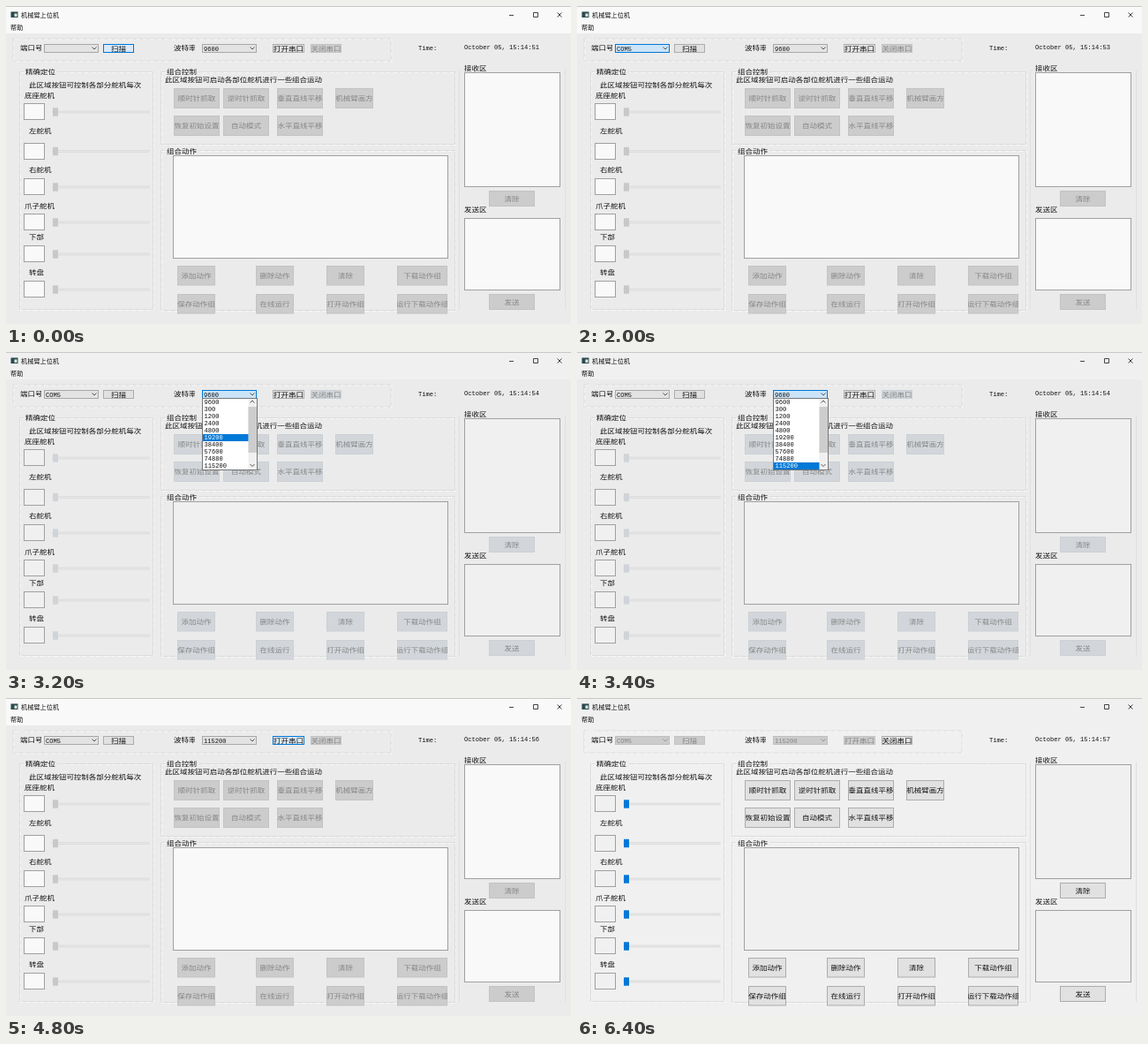
These frames come from a looping animation (640 by 360 pixels, 7000 ms). An HTML page:

```html
<!DOCTYPE html>
<html lang="zh">
<head>
<meta charset="utf-8">
<title>机械臂上位机</title>
<style>
html, body { margin: 0; width: 100%; height: 100%; overflow: hidden; background: #ebebeb; }
svg { display: block; }
text { white-space: pre; }
.ui { font: 7.2px "Noto Sans CJK SC", "Noto Sans CJK JP", sans-serif; }
.label { font: 500 8.5px "Noto Sans CJK SC", "Noto Sans CJK JP", sans-serif; }
.mono { font: 7.08px "Liberation Mono", monospace; }
</style>
</head>
<body>
<svg id="stage" width="640" height="360" viewBox="0 0 640 360"></svg>
<script>
const LOOP = 7000;
const BLUE = '#0078d7';
const RATES = [9600, 300, 1200, 2400, 4800, 19200, 38400, 57600, 74880, 115200];
const stage = document.getElementById('stage');

// Each step changes some values from its time on.
const STEPS = [
  [0, { sec: 51, port: '', baud: '9600', focus: 'scan', list: null, shift: 0,
        on: false, dim: false, glow: 0, bg: '#ebebeb' }],
  [200, { port: 'COM5' }],
  [1000, { sec: 52 }],
  [1200, { focus: 'port' }],
  [1800, { sec: 53 }],
  [2600, { focus: 'baud' }],
  [2800, { list: -1, shift: 46 }],
  [3000, { list: 0, shift: 0, sec: 54, dim: true }],
  [3200, { list: 5 }],
  [3400, { list: 9 }],
  [3600, { list: null, baud: '115200', dim: false }],
  [4000, { sec: 55 }],
  [4400, { focus: 'open' }],
  [4800, { sec: 56 }],
  [5000, { on: true, focus: '', glow: 1 }],
  [5200, { bg: '#f0f0f0' }],
  [5600, { glow: 0.5, sec: 57 }],
  [6000, { glow: 0 }]
];

const rect = (x, y, w, h, fill, stroke = 'none', extra = '') =>
  `<rect x="${x}" y="${y}" width="${w}" height="${h}" fill="${fill}" stroke="${stroke}" ${extra}/>`;
const path = (d, color, width = 1) =>
  `<path d="${d}" fill="none" stroke="${color}" stroke-width="${width}"/>`;
const text = (x, y, str, cls, fill = '#111', anchor = 'start') =>
  `<text x="${x}" y="${y}" class="${cls}" fill="${fill}" text-anchor="${anchor}">${str}</text>`;
// Squat lettering, placed by its vertical centre.
const label = (x, cy, str, fill = '#111', anchor = 'start') =>
  `<g transform="translate(${x} ${cy + 2.7}) scale(1 .86)">${text(0, 0, str, 'label', fill, anchor)}</g>`;
const clip = (x, y, w, h, body) =>
  `<svg x="${x}" y="${y}" width="${w}" height="${h}" overflow="hidden">${body}</svg>`;
const chevron = (x, y, color, dir = 1) =>
  path(`M${x - 2.5} ${y - dir}l2.5 ${2.5 * dir}l2.5 ${-2.5 * dir}`, color, 0.9);

function group(x, y, w, h, gap) {
  const d = `M${x + 5} ${y}H${x}V${y + h}H${x + w}V${y}H${x + gap}`;
  return path(d, '#dcdcdc') +
    `<path d="${d}" transform="translate(1 1)" fill="none" stroke="#f8f8f8" stroke-dasharray="5 3"/>`;
}

function button(x, y, w, h, str, s, enabled, hot = 0) {
  const off = s.dim ? '#d2d6da' : '#cccccc';
  let out = rect(x + .5, y + .5, w - 1, h - 1, enabled ? '#e1e1e1' : off, enabled ? '#adadad' : s.dim ? '#cbd0d5' : '#c3c3c3');
  if (hot) out += rect(x + .5, y + .5, w - 1, h - 1, '#d9eafa', BLUE, `opacity="${hot}"`);
  return out + clip(x, y, w, h, label(w / 2, h / 2, str, enabled ? '#111' : '#858585', 'middle'));
}

function combo(x, str, focused, enabled) {
  const fill = !enabled ? '#cccccc' : focused ? '#cce4f7' : '#e3e3e3';
  const edge = !enabled ? '#bfbfbf' : focused ? BLUE : '#a8a8a8';
  const ink = enabled ? '#111' : '#858585';
  return rect(x + .5, 43.5, 61, 9, fill, edge) + text(x + 2, 50.6, str, 'mono', ink) +
    chevron(x + 57, 47.5, enabled ? '#444' : '#909090');
}

function popup(s) {
  const h = 82 - s.shift;
  let body = rect(.5, .5, 62, 81, '#fff', '#777') + rect(52.5, 1, 9.5, 80, '#f0f0f0') +
    rect(52.5, 10, 9.5, 52, '#cdcdcd') + chevron(57, 4.5, '#444', -1) + chevron(57, 76, '#444');
  RATES.forEach((rate, i) => {
    const y = 1 + i * 8, hot = i === s.list;
    if (hot) body += rect(1, y, 51.5, 8, BLUE);
    body += text(2.5, y + 6.4, rate, 'mono', hot ? '#fff' : '#111');
  });
  return clip(222, 52, 63, h, `<g transform="translate(0 ${-s.shift})">${body}</g>`) +
    path(`M222 ${51.5 + h}h63`, '#777');
}

function windowBar(paper) {
  return rect(0, 0, 640, 31, paper) + path('M0 .5H640', '#c8c8c8') +
    rect(5.5, 6.5, 8, 6.5, '#2c4a4c') + rect(9.5, 8.5, 3, 3.5, '#dfe9e6') +
    text(17, 12.6, '机械臂上位机', 'ui') + text(5, 26.8, '帮助', 'ui') +
    path('M570 10.5h5M597.5 7.5h5v5h-5zM624.5 7.5l5 5M629.5 7.5l-5 5', '#333', 0.9);
}

function topRow(s) {
  return group(8, 37, 428, 25, 12) +
    clip(16, 42, 24, 12, label(0, 5.5, '端口号')) + combo(43, s.port, s.focus === 'port', !s.on) +
    button(110, 43, 35, 10, '扫描', s, !s.on, +(s.focus === 'scan')) +
    clip(190, 42, 24, 12, label(0, 5.5, '波特率')) + combo(222, s.baud, s.focus === 'baud', !s.on) +
    button(302, 43, 36, 10, '打开串口', s, !s.on, s.focus === 'open' ? 1 : s.glow * 0.7) +
    button(345, 43, 35, 10, '关闭串口', s, s.on) +
    text(467, 49.7, 'Time:', 'mono') + text(519, 48.7, `October 05, 15:14:${s.sec}`, 'mono');
}

function joints(s, paper) {
  const rows = [
    ['底座舵机', 21, 101, 120], ['左舵机', 26, 141, 164.5], ['右舵机', 26, 185, 205],
    ['爪子舵机', 21, 226, 245], ['下部', 26, 261, 281], ['转盘', 26, 301, 321]
  ];
  return group(15.5, 74.5, 151, 269, 43) + label(22, 74.5, '精确定位') +
    label(26, 89, '此区域按钮可控制各部分舵机每次') +
    rows.map(([name, x, ly, y]) => label(x, ly, name) +
      rect(20.5, Math.round(y) - 9.5, 23, 18, paper, '#a0a0a0') +
      rect(53, y - 1, 109, 2, '#e7e7e7', '#d4d4d4', 'stroke-width=".6"') +
      rect(53, y - 4.7, 6, 9.4, s.on ? BLUE : s.dim ? '#d0d4d8' : '#c8c8c8')).join('');
}

function middle(s, paper) {
  const moves = [['顺时针抓取', '逆时针抓取', '垂直直线平移', '机械臂画方'], ['恢复初始设置', '自动模式', '水平直线平移']];
  const acts = [['添加动作', '删除动作', '清除', '下载动作组'], ['保存动作组', '在线运行', '打开动作组', '运行下载动作组']];
  const grid = (rows, xs, ys, ws, h) => rows.map((row, r) =>
    row.map((str, i) => button(xs[i], ys[r], ws[i], h, str, s, s.on)).join('')).join('');
  return group(175.5, 74.5, 333, 82, 43) + label(182, 74.5, '组合控制') +
    label(180, 83, '此区域按钮可启动各部位舵机进行一些组合运动') +
    grid(moves, [190, 246, 307, 373], [93, 124], [52, 52, 52, 43], 23) +
    group(175.5, 163.5, 333, 181, 43) + label(182, 164, '组合动作') +
    rect(189.5, 169.5, 311, 116, paper, '#a0a0a0') +
    grid(acts, [194, 283, 363, 443], [294, 326], [43, 43, 43, 57], 22.5);
}

function right(s, paper) {
  return path('M513.5 72V344M633.5 72V344', '#e0e0e0') +
    label(519, 70, '接收区') + rect(519.5, 75.5, 108, 129, paper, '#a0a0a0') +
    button(547, 209, 52, 18, '清除', s, s.on) +
    label(519, 230.5, '发送区') + rect(519.5, 240.5, 108, 81, paper, '#a0a0a0') +
    button(547, 326, 52, 18, '发送', s, s.on);
}

function draw(s) {
  const paper = s.on || s.dim ? '#f0f0f0' : '#f9f9f9';
  stage.innerHTML = rect(0, 0, 640, 360, s.bg) + windowBar(paper) + topRow(s) +
    joints(s, paper) + middle(s, paper) + right(s, paper) + (s.list === null ? '' : popup(s));
}

let shown = -1;
const start = performance.now();
function tick() {
  const t = (performance.now() - start) % LOOP;
  const past = STEPS.filter(([at]) => at <= t);
  if (past.length !== shown) {
    shown = past.length;
    draw(Object.assign({}, ...past.map(([, change]) => change)));
  }
  requestAnimationFrame(tick);
}
tick();
</script>
</body>
</html>
```
